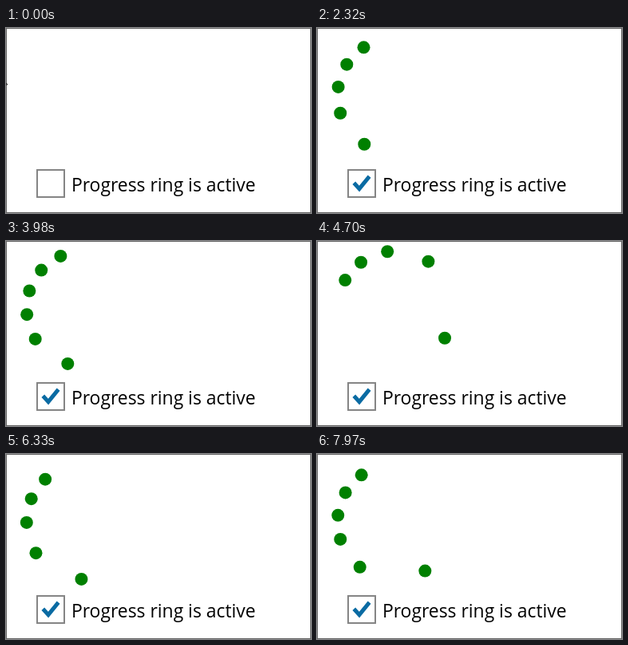
Write an HTML page with a canvas that moves like this. It is 382 px wide and 232 px high and loops after 8000 ms.

```html
<!DOCTYPE html>
<html lang="en">
<head>
<meta charset="utf-8">
<title>Progress ring</title>
<style>
  html, body { margin: 0; width: 100%; height: 100%; overflow: hidden; background: #fff; }
  canvas { display: block; width: 382px; height: 232px; }
</style>
</head>
<body>
<canvas id="stage"></canvas>
<script>
const W = 382, H = 232, LOOP = 8000;
const canvas = document.getElementById('stage');
const ctx = canvas.getContext('2d');
const scale = window.devicePixelRatio || 1;
canvas.width = W * scale;
canvas.height = H * scale;

const CHECKED_AT = 1550;

// Six dots share one rotation, each a little later and 6 degrees behind.
const RING = {
  x: 98, y: 84.8, r: 72.2, dot: 8, zero: -83.6,
  count: 6, delay: 0.167, lag: 6, life: 3.217,
  start: 1574, rate: 1.08 / 1000, period: 4.418
};

// Two laps, each a sweep, a slow drift and a rush: time in s, degrees, easing.
const KEYS = [
  { t: 0, a: -110 },
  { t: 0.433, a: 10, spline: [0.02, 0.33, 0.38, 0.77] },
  { t: 1.2, a: 93 },
  { t: 1.617, a: 205, spline: [0.57, 0.17, 0.95, 0.75] },
  { t: 2.017, a: 357, spline: [0, 0.19, 0.07, 0.72] },
  { t: 2.783, a: 439 },
  { t: 3.217, a: 585, spline: [0, 0, 0.95, 0.37] }
];

const mix = (a, b, k) => a + (b - a) * k;
const progress = (t, from, to) => Math.min(1, Math.max(0, (t - from) / (to - from)));

function bezier(a, b, s) {
  const u = 1 - s;
  return 3 * u * u * s * a + 3 * u * s * s * b + s * s * s;
}

function ease(spline, x) {
  if (!spline) return x;
  const [x1, y1, x2, y2] = spline;
  let lo = 0, hi = 1;
  for (let n = 0; n < 24; n++) {
    const mid = (lo + hi) / 2;
    if (bezier(x1, x2, mid) < x) lo = mid; else hi = mid;
  }
  return bezier(y1, y2, lo);
}

function rotation(t) {
  const i = KEYS.findIndex(key => key.t > t);
  const from = KEYS[i - 1], to = KEYS[i];
  return mix(from.a, to.a, ease(to.spline, progress(t, from.t, to.t)));
}

function drawRing(t) {
  if (t < RING.start) return;
  const now = (t - RING.start) * RING.rate % RING.period;
  ctx.fillStyle = '#008000';
  for (let n = 0; n < RING.count; n++) {
    const own = now - n * RING.delay;
    if (own < 0 || own >= RING.life) continue;
    const a = (rotation(own) - n * RING.lag + RING.zero) * Math.PI / 180;
    ctx.beginPath();
    ctx.arc(RING.x + RING.r * Math.sin(a), RING.y - RING.r * Math.cos(a), RING.dot, 0, 2 * Math.PI);
    ctx.fill();
  }
}

function trace(points) {
  ctx.beginPath();
  points.forEach(([x, y]) => ctx.lineTo(x, y));
}

function drawCheckBox(checked) {
  ctx.strokeStyle = '#858585';
  ctx.lineWidth = 2;
  ctx.strokeRect(39, 178, 34, 34);
  if (checked) {
    trace([[46.3, 194.3], [53, 201.6], [65.6, 186.2]]);
    ctx.strokeStyle = '#0a6ba3';
    ctx.lineWidth = 5;
    ctx.stroke();
  }
  ctx.fillStyle = '#000';
  ctx.font = '22.9px "Open Sans", "Noto Sans", sans-serif';
  ctx.fillText('Progress ring is active', 81.9, 205);
}

// The pointer slips off at the left, comes in from below, clicks and leaves.
function pointerTip(t) {
  if (t < 840) return [mix(-10, -14, progress(t, 270, 540)), 59];
  const arrive = progress(t, 840, 1250), leave = progress(t, 1600, 1950);
  return [mix(97, 57, arrive) + 17 * leave, mix(228, 196, arrive) + 38 * leave];
}

function drawPointer(t) {
  const [x, y] = pointerTip(t);
  ctx.save();
  ctx.translate(x + 0.5, y + 0.5);
  trace([[0, 0], [0, 16], [3.7, 12.6], [6.2, 18.3], [8.6, 17.2], [6.2, 11.7], [11.3, 11.4]]);
  ctx.closePath();
  ctx.fillStyle = '#fff';
  ctx.fill();
  ctx.strokeStyle = '#000';
  ctx.lineWidth = 1;
  ctx.stroke();
  ctx.restore();
}

function draw(t) {
  ctx.setTransform(scale, 0, 0, scale, 0, 0);
  ctx.fillStyle = '#fff';
  ctx.fillRect(0, 0, W, H);
  drawRing(t);
  drawCheckBox(t >= CHECKED_AT);
  ctx.strokeStyle = '#666';
  ctx.lineWidth = 1;
  ctx.strokeRect(0.5, 0.5, W - 1, H - 1);
  drawPointer(t);
}

const start = performance.now();
function tick() {
  draw((performance.now() - start) % LOOP);
  requestAnimationFrame(tick);
}
tick();
</script>
</body>
</html>
```
